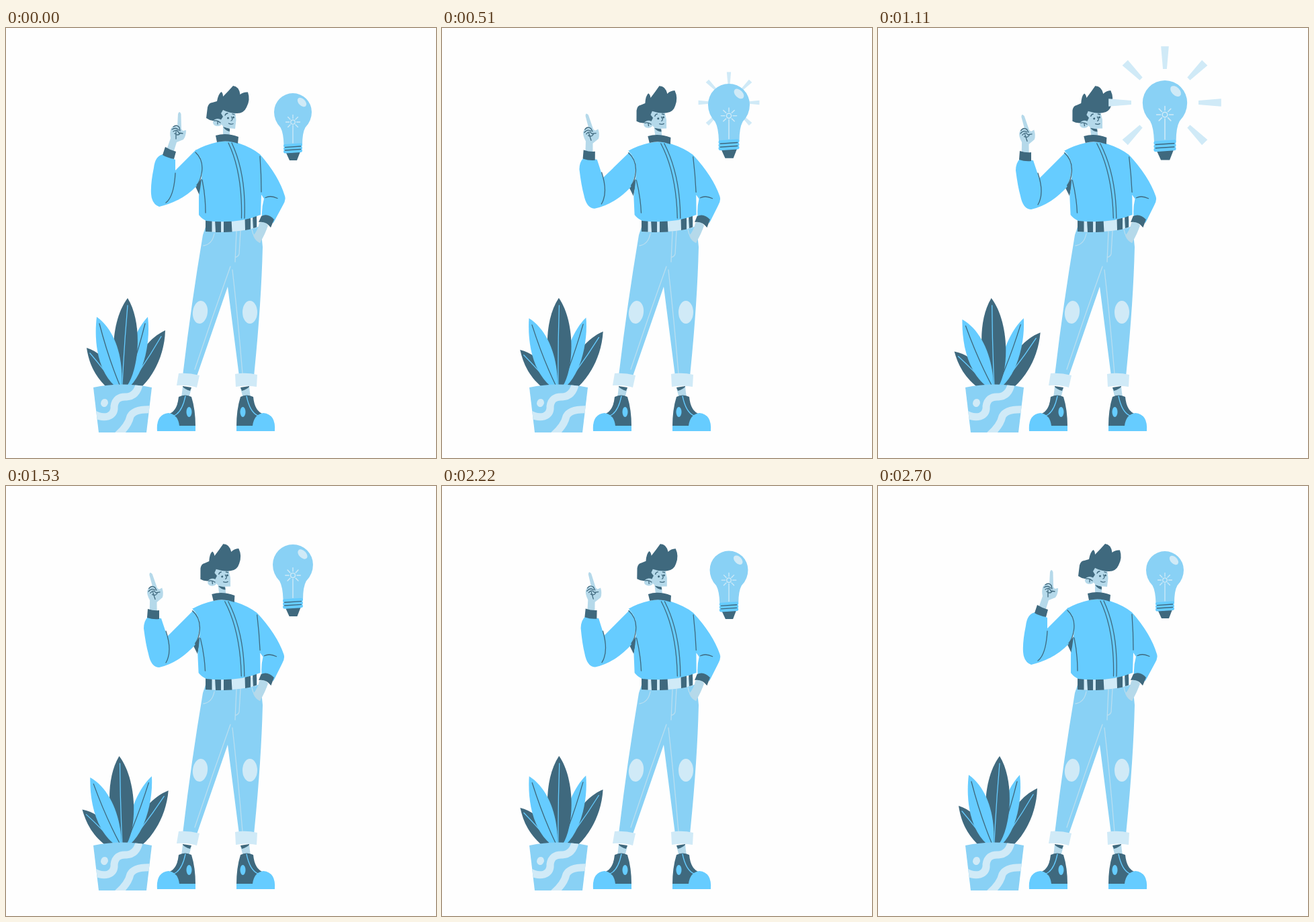
Animation, 640 px wide and 640 px high, one loop 2760 ms. Source, as an HTML page:

```html
<!DOCTYPE html>
<html lang="en">
<head>
<meta charset="utf-8">
<title>Idea</title>
<style>
  html, body { margin: 0; height: 100%; overflow: hidden; background: #fefefe; }
  svg { display: block; width: 100%; height: 100%; }
  .dark { fill: #3f697e; }
  .sky { fill: #66ccff; }
  .mid { fill: #89d1f5; }
  .pale { fill: #d0eaf7; }
  .skin { fill: #b5d9ea; }
  .line { fill: none; stroke: #3f697e; stroke-width: 1.3; stroke-linecap: round; stroke-linejoin: round; }
  .line.sky { fill: none; stroke: #66ccff; }
  .line.pale { fill: none; stroke: #d0eaf7; }
  .line.seam { stroke: #b9def0; }
</style>
</head>
<body>
<svg viewBox="0 0 640 640">
  <defs>
    <clipPath id="potShape"><path d="M130 535Q173 526 217 535L209 602H138Z"/></clipPath>
    <g id="shoe">
      <path class="skin" d="M263 534L276 536L272 551H261Z"/>
      <path class="dark" d="M263 533L276 535L274 540Q267 538 263 534Z"/>
      <path class="dark" d="M257 549Q267 544 276 549Q282 568 282 593H256L241 575Q255 571 257 549Z"/>
      <path class="line sky" d="M267 548Q262 572 250 577"/>
      <path class="sky" d="M225 600Q223 575 242 573Q256 575 258 592H282V600Z"/>
      <ellipse class="sky" cx="272.5" cy="571.5" rx="4" ry="7.5"/>
    </g>
  </defs>

  <g id="leaves">
    <g data-pivot="163 533" data-turn="-7">
      <path class="dark" d="M148 533C129 514 123 495 120 476C143 483 160 505 166 533Z"/>
      <path class="line sky" d="M125 484Q143 505 162 531"/>
    </g>
    <g data-pivot="184 533" data-turn="3.4">
      <path class="dark" d="M182 533C190 496 207 464 237 450C236 485 221 515 203 533Z"/>
      <path class="line sky" d="M231 459Q209 497 184 531"/>
    </g>
    <g data-pivot="181 533" data-turn="3.4">
      <path class="sky" d="M177 533C178 496 188 454 211 430C215 462 208 509 185 533Z"/>
      <path class="line" d="M207 440Q195 488 179 531"/>
    </g>
    <g data-pivot="174 533" data-turn="-5.6">
      <path class="dark" d="M168 533C156 500 155 437 181 402C203 437 199 505 180 533Z"/>
      <path class="line sky" d="M181 413Q176 470 173 531"/>
    </g>
    <g data-pivot="170 533" data-turn="-5.6">
      <path class="sky" d="M162 533C135 508 131 464 135 430C162 449 175 490 172 533Z"/>
      <path class="line" d="M139 440Q152 490 169 531"/>
    </g>
  </g>
  <g clip-path="url(#potShape)">
    <path class="mid" d="M125 520H220V605H125Z"/>
    <ellipse class="pale" cx="146.5" cy="558" rx="5.3" ry="6.2" transform="rotate(20 146.5 558)"/>
    <g fill="none" stroke="#d0eaf7" stroke-width="11">
      <path d="M128 573Q141 581 152 578Q162 574 161 563Q163 548 179 549Q196 548 199 526"/>
      <path d="M220 568Q191 566 185 578Q182 592 166 606"/>
    </g>
  </g>

  <use href="#shoe"/>
  <use href="#shoe" transform="matrix(-1 0 0 1 625 0)"/>
  <path class="mid" d="M297 296L293 308Q275 415 263 518H284L330 385L347 518H369Q380 410 382 326L379 296Z"/>
  <ellipse class="pale" cx="289" cy="423" rx="11" ry="17" transform="rotate(7 289 423)"/>
  <ellipse class="pale" cx="363" cy="423" rx="11" ry="17"/>
  <path class="line seam" d="M334 355Q307 430 281 508M337 360Q346 440 352 515M343 303L341 348M349 302L347 336Q346 340 342 341M310 306Q307 322 294 324M366 300Q368 312 378 319"/>
  <path class="pale" d="M257 514Q272 513 288 517L284 535Q270 531 254 532ZM341 515Q357 512 374 516L373 534Q357 531 342 534Z"/>
  <path class="pale" d="M297 285H374V297Q340 306 297 303Z"/>
  <path class="dark" d="M297 285H306.5V303.5L297 303ZM311 285H320V304H312ZM324 285H335.5L336.5 303.5L324 304ZM355.5 282H364V299.5L356 301ZM367 280H373V296.5L368 298Z"/>
  <path class="skin" d="M377 290Q385 286 390 294Q386 306 378 320Q371 317 368 309Q375 301 377 290Z"/>

  <g id="arm">
    <path id="gap" class="dark"/>
    <g id="hand">
      <path class="skin" d="M238 184L245 164Q243 154 246 149Q250 144 255 147L256 128Q258 122 260.5 128L261 150L263 153L268 152Q268 161 264 166L254 170L249 186Z"/>
      <path class="line" d="M249 147Q254 143 258 148L259 153M247 151Q253 147 257 152M249 154Q255 150 257 156L263 157M253 154L253 165M251 157Q256 161 259 157"/>
    </g>
    <path id="sleeve" class="sky"/>
    <path id="cuff" class="dark"/>
    <path id="crease" class="line"/>
  </g>

  <g id="head">
    <path class="skin" d="M323 143L333 148V162H323Z"/>
    <path class="dark" d="M323 147L333 150V154Q327 153 323 147Z"/>
    <path class="skin" d="M317 122L341 123L342.5 137L341 150L331 149Q325 148 322 145L317 138Z"/>
    <path class="dark" d="M298 134L300 118Q302 111 307 111L314 109Q316 98 320.5 95Q323 97 323 102Q331 94 338 86Q347 87 348.5 99Q353 95 360 95.5Q364 107 358 118Q354 127 344 127Q333 127 323 122L320 127L323 132L319 138L308 138Q302 137 298 134Z"/>
    <ellipse class="skin" cx="315" cy="140.5" rx="7" ry="5.5"/>
    <path class="line" d="M310 138Q315 137 319 141M315 139V143M326 130Q327 127 330 127M335.5 132Q338.5 137 335 138M331.5 142Q335 144 338 142.5M337 128L340 129"/>
    <g class="dark"><circle cx="330.5" cy="134" r="1.5"/><circle cx="338.5" cy="133" r="1.5"/></g>
  </g>

  <g id="jacket">
    <path class="sky" d="M282 182Q296 174 314 170Q330 166 345 171Q366 178 378 188Q406 220 415 250Q417 256 412 264L398 290L381 283Q380 268 384 254L380 248L379 278Q345 292 298 287Q290 283 287 278V250Q292 225 292 205Q291 190 282 182Z"/>
    <path class="dark" d="M312 160Q328 155 346 162L345 172Q330 166 314 170ZM376 289L380 280Q390 275 399 285L394 297Q387 287 376 289Z"/>
    <path class="line" d="M282 185Q294 196 291.5 214Q290 226 284 234M292 226Q297 250 297 275M331 171Q352 215 350.5 283M336 171Q357.5 217 355 283M378 191Q380 218 380 244M386 252.5Q394 248.5 404 253.5"/>
  </g>

  <g id="rays" class="pale"></g>
  <g id="bulb">
    <path class="mid" d="M399 125A28 28 0 0 1 455 125Q455 138 445.5 148Q441 156 441 174H413.5Q413 156 408.5 148Q399 138 399 125Z"/>
    <ellipse class="pale" cx="440.5" cy="110.5" rx="5" ry="8" transform="rotate(-45 440.5 110.5)"/>
    <path id="filament" class="line pale"/>
    <circle class="line pale" cx="427" cy="140" r="3.2"/>
    <path class="dark" d="M417 186L438 184L433 197H422Z"/>
    <path d="M415.5 175.5L438.5 174M415.5 179.8L438.5 178.3M415.5 184L438.5 182.5" fill="none" stroke="#66ccff" stroke-width="5" stroke-linecap="round"/>
    <path class="line" d="M415.5 177.6L438.5 176M415.5 182L438.5 180.5"/>
  </g>
</svg>
<script>
const $ = id => document.getElementById(id);
const place = (id, transform) => $(id).setAttribute('transform', transform);

// Each pair holds the path with the hand near the head, then with it held out.
const poses = {
  sleeve: [
    'M283 181Q268 196 252 212L252 196L234 188Q222 190 220 208Q215 232 216 247Q217 262 228 266Q262 258 284 235Q293 218 292 205Q291 190 283 181Z',
    'M279 185Q260 204 240 224L231 197L211 195Q205 201 205 212Q208 236 212 250Q216 270 228 270Q256 264 281 237Q288 222 288 208Q288 194 279 185Z'],
  cuff: ['M237 177Q245 182 253 184L250 195Q240 193 233 189Z',
         'M211 183Q220 186 228 185L228 198Q219 199 210 196Z'],
  crease: ['M252 216Q250 251 238 260', 'M238 216Q248 246 238 263'],
  gap: ['M282 236L294 220L288 249Z', 'M279 238L291 220L285 250Z']
};

// Keys are [time, value]; slopes come from the neighbouring keys.
const scaleKeys = [[0, 1], [270, 1], [540, 1.12], [750, 1.17], [1080, 1.19], [1530, 1.07], [1980, 1.035], [2460, 1], [2700, 1]];
const heightKeys = [[0, 125], [270, 124.5], [540, 113], [750, 111], [1080, 111], [1530, 117], [1980, 124], [2460, 125], [2700, 125]];
const rayKeys = [[0, .2], [300, .3], [540, .68], [750, 1], [1080, 1.2], [1500, .3], [2700, .2]];

const ease = x => { x = Math.min(1, Math.max(0, x)); return x * x * (3 - 2 * x); };

function track(keys, t) {
  const last = keys.length - 1;
  let i = 0;
  while (i < last - 1 && t >= keys[i + 1][0]) i++;
  const slope = n => {
    if (n === 0 || n === last) return 0;
    const [a, b] = [keys[n - 1], keys[n + 1]];
    return (b[1] - a[1]) / (b[0] - a[0]);
  };
  const [t0, v0] = keys[i], [t1, v1] = keys[i + 1];
  const span = t1 - t0, x = (t - t0) / span;
  return v0 + (v1 - v0) * ease(x) + span * x * (1 - x) * ((1 - x) * slope(i) - x * slope(i + 1));
}

function morph(a, b, p) {
  const goal = b.match(/[\d.]+/g);
  let i = 0;
  return a.replace(/[\d.]+/g, n => (+n + (goal[i++] - n) * p).toFixed(2));
}

let filament = 'M427 145V171', rays = '';
for (let a = -135; a <= 135; a += 45) {
  const s = Math.sin(a * Math.PI / 180), c = Math.cos(a * Math.PI / 180);
  filament += `M${427 + 5.5 * s} ${140 - 5.5 * c}L${427 + 10.5 * s} ${140 - 10.5 * c}`;
  rays += `<path d="M-2.5 -43L-5 -72H5L2.5 -43Z" transform="rotate(${a})"/>`;
}
$('filament').setAttribute('d', filament);
$('rays').innerHTML = rays;

function draw(t) {
  const p = ease(t / 540) - ease((t - 2100) / 600);
  const lift = t < 540 ? Math.sin(Math.PI * t / 540) : 0;
  const k = .045 * p;

  for (const id in poses) $(id).setAttribute('d', morph(...poses[id], p));
  place('arm', `matrix(${1 + .05 * lift} ${.12 * lift} ${-.03 * lift} 1 ${-8.1 * lift} ${-34.2 * lift})`);
  place('hand', `translate(${-26 * p} ${5 * p}) rotate(${-18 * p} 246 180)`);
  place('head', `translate(${-6 * p} ${p}) rotate(${-7 * p} 328 157)`);
  place('jacket', `matrix(1 0 ${k} ${1 - .008 * p} ${-287 * k} ${2.3 * p})`);

  const sway = Math.sin(Math.PI * t / 2700);
  for (const leaf of $('leaves').children) {
    const { turn, pivot } = leaf.dataset;
    leaf.setAttribute('transform', `rotate(${turn * sway} ${pivot})`);
  }

  place('bulb', `translate(427 ${track(heightKeys, t)}) scale(${track(scaleKeys, t)}) translate(-427 -125)`);
  place('rays', `translate(427 111) scale(${track(rayKeys, t)})`);
  $('rays').style.display = t > 300 && t < 1500 ? '' : 'none';
}

function frame(now) {
  draw(Math.min(2700, Math.floor(now % 2760 / 30) * 30));
  requestAnimationFrame(frame);
}
requestAnimationFrame(frame);
</script>
</body>
</html>
```
